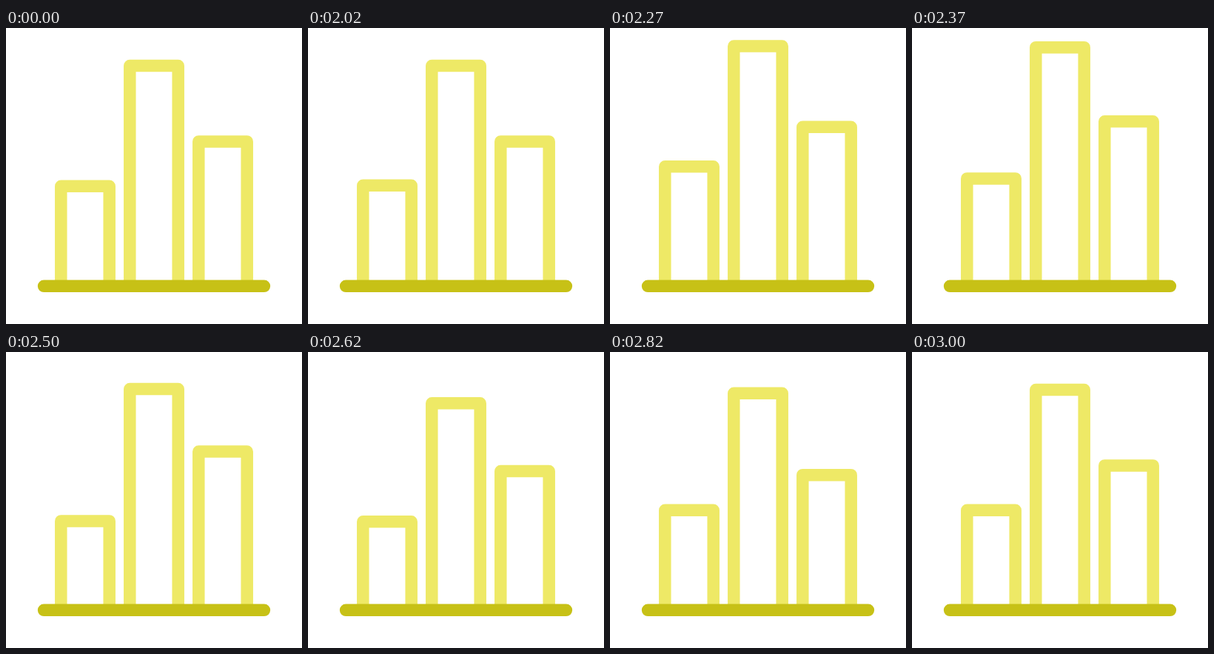
Recreate the animation shown at these times as an HTML page. Size 400x400 px, loop 3020 ms.

```html
<!DOCTYPE html>
<html lang="en">
<head>
<meta charset="utf-8">
<title>Bar chart</title>
<style>
  html, body { margin: 0; width: 100%; height: 100%; overflow: hidden; background: #fff; }
  svg { display: block; width: 100%; height: 100%; }
  path { fill: none; stroke-width: 16.5; stroke-linejoin: round; }
  .bar { stroke: #eee966; }
  .base { stroke: #c7c116; stroke-linecap: round; }
</style>
</head>
<body>
<svg viewBox="0 0 400 400">
  <path class="bar"/>
  <path class="bar"/>
  <path class="bar"/>
  <path class="base" d="M51.1 348.8H348.9"/>
</svg>
<script>
const LOOP = 3020;
const START = 2000;
const STAGGER = 83.3;
const FLOOR = 348.8;
const HALF_WIDTH = 32.7;
const RISE = -27.5;
const DIP = 18.5;

const paths = document.querySelectorAll('.bar');
const bars = [
  { x: 107, top: 213.8 },
  { x: 200, top: 51.1 },
  { x: 293, top: 153.4 }
];

// Cubic Bezier easing with control points (x1, 0) and (x2, 1).
function ease(p, x1 = 1 / 3, x2 = 2 / 3) {
  let lo = 0, hi = 1;
  for (let i = 0; i < 24; i++) {
    const s = (lo + hi) / 2, r = 1 - s;
    if (3 * r * r * s * x1 + 3 * r * s * s * x2 + s * s * s < p) lo = s;
    else hi = s;
  }
  return lo * lo * (3 - 2 * lo);
}

function offset(t) {
  if (t <= 0 || t >= 833) return 0;
  if (t < 248) return RISE * ease(t / 248, 0.33, 0.2);
  if (t < 555) return RISE + (DIP - RISE) * ease((t - 248) / 307);
  return DIP * (1 - ease((t - 555) / 278));
}

// Pictures last 20 and 30 ms in turn, sampling the motion every 25 ms.
function sampleTime(t) {
  return 50 * Math.floor(t / 50) + (t % 50 >= 20 ? 25 : 0);
}

function draw(ms) {
  const t = sampleTime(ms % LOOP) - START;
  bars.forEach(({ x, top }, i) => {
    const y = top + offset(t - i * STAGGER);
    paths[i].setAttribute('d',
      `M${x - HALF_WIDTH} ${FLOOR}V${y.toFixed(2)}H${x + HALF_WIDTH}V${FLOOR}`);
  });
}

let origin;
function tick(now) {
  origin ??= now;
  draw(now - origin);
  requestAnimationFrame(tick);
}
draw(0);
requestAnimationFrame(tick);
</script>
</body>
</html>
```
